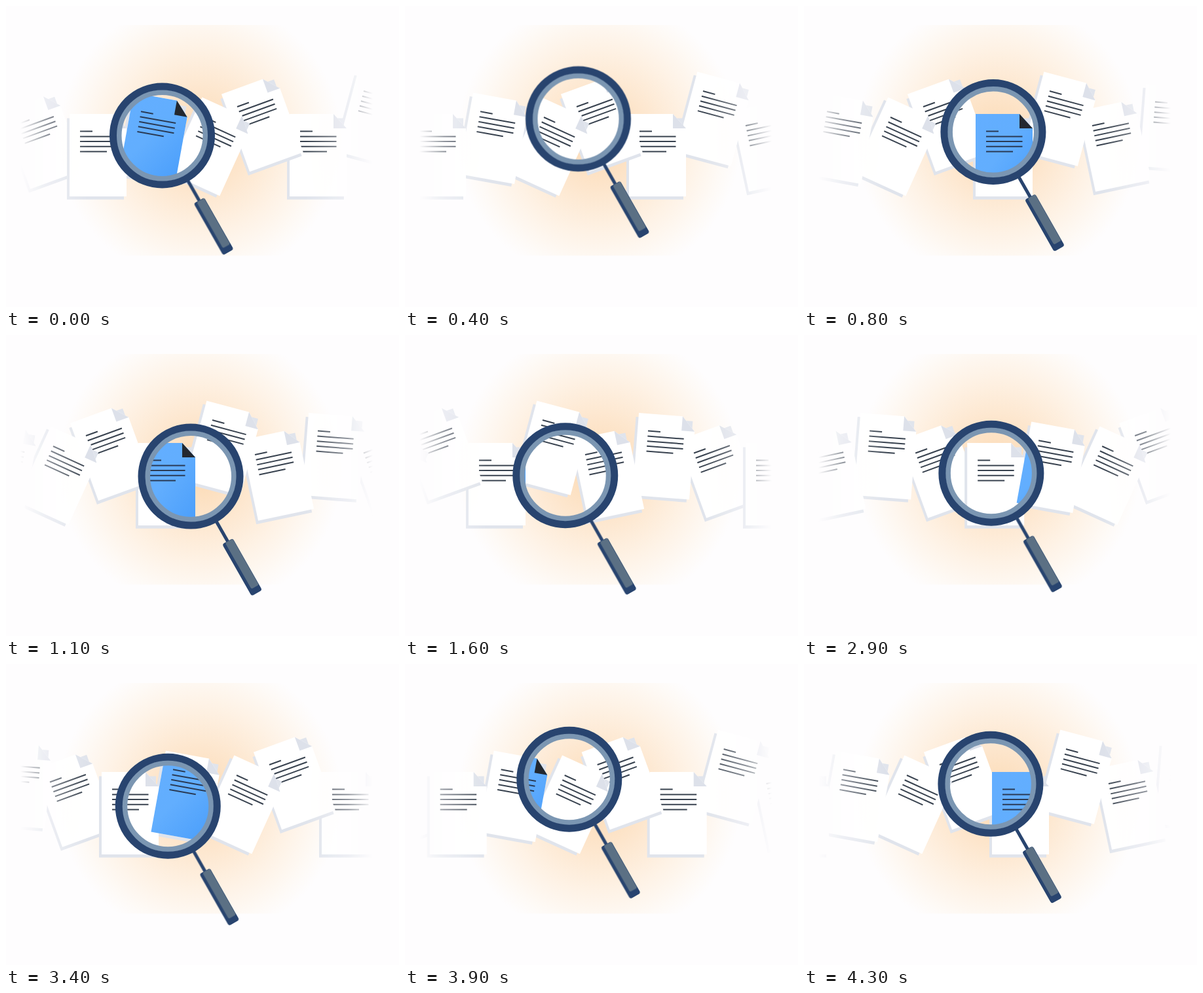
An HTML page for the animation above (4400 ms loop, 600 px wide and 460 px high).

```html
<!DOCTYPE html>
<html lang="en">
<head>
<meta charset="utf-8">
<title>Document search</title>
<style>
  html, body { margin: 0; width: 100%; height: 100%; overflow: hidden; background: #fefdfe; }
  svg { display: block; width: 100%; height: 100%; }
</style>
</head>
<body>
<svg viewBox="0 0 600 460">
  <defs>
    <radialGradient id="glow" gradientUnits="userSpaceOnUse" cx="296" cy="205" r="217">
      <stop offset="0" stop-color="#fbd9b2"/>
      <stop offset=".35" stop-color="#fde6cd"/>
      <stop offset=".65" stop-color="#fef2e5"/>
      <stop offset=".88" stop-color="#fefaf6"/>
      <stop offset="1" stop-color="#fefdfe"/>
    </radialGradient>
    <linearGradient id="fade" gradientUnits="userSpaceOnUse" x1="22" x2="560" y1="0" y2="0">
      <stop offset="0" stop-color="#fff" stop-opacity="0"/>
      <stop offset=".07" stop-color="#fff" stop-opacity=".55"/>
      <stop offset=".19" stop-color="#fff"/>
      <stop offset=".81" stop-color="#fff"/>
      <stop offset=".93" stop-color="#fff" stop-opacity=".55"/>
      <stop offset="1" stop-color="#fff" stop-opacity="0"/>
    </linearGradient>
    <linearGradient id="blue" x1="0" y1="0" x2="1" y2="1">
      <stop offset="0" stop-color="#63aeff"/>
      <stop offset=".45" stop-color="#62aefe"/>
      <stop offset="1" stop-color="#4a9efb"/>
    </linearGradient>
    <mask id="sides" maskUnits="userSpaceOnUse" x="0" y="0" width="600" height="460">
      <rect width="600" height="460" fill="url(#fade)"/>
    </mask>
    <clipPath id="lens"><circle id="lensHole" r="64"/></clipPath>

    <!-- The page's origin is the start of its first text line. -->
    <path id="sheet" d="M-16-26.3H51L71-4.3V99.7H-16Z"/>
    <path id="fold" d="M51-26.3V-4.3H71Z"/>
    <path id="text" d="M0 0H19M0 8H55.5M0 15.7H55.5M0 23.3H55.5M0 31.2H41" fill="none" stroke-width="2"/>
    <g id="page">
      <path d="M-20-20H67V104.4H-20Z" fill="#e0e4ec"/>
      <use href="#sheet" fill="#fff"/>
      <use href="#fold" fill="#dde1ea"/>
      <use href="#text" stroke="#38424f"/>
    </g>
    <g id="match">
      <use href="#sheet" fill="url(#blue)"/>
      <use href="#fold" fill="#23282f"/>
      <use href="#text" stroke="#2a3b55"/>
    </g>
  </defs>

  <rect x="76" y="29" width="440" height="352.5" fill="url(#glow)"/>
  <g id="pages" mask="url(#sides)"></g>
  <g id="matches" clip-path="url(#lens)"></g>
  <g id="glass">
    <circle r="66" fill="none" stroke="#7b96b2" stroke-width="8"/>
    <circle r="75" fill="none" stroke="#28446f" stroke-width="11"/>
    <g transform="rotate(60.4)">
      <path d="M79 0H117" stroke="#28446f" stroke-width="5"/>
      <rect x="114" y="-9" width="91" height="18.5" rx="3.5" fill="#28446f"/>
      <rect x="114.5" y="-8.5" width="81" height="13" rx="2.5" fill="#5b7084"/>
    </g>
  </g>
</svg>
<script>
const LOOP = 4400, STEP = 100, ROW = 759;
const CENTER = [264, 198], ORBIT = 25.5;

// x, y, tilt, is a match
const DOCS = [
  [113, 191.4, 0],
  [206, 161.3, 10.3, true],
  [303, 170, 24.5],
  [353, 154, -20],
  [449, 191.4, 0, true],
  [546, 130, 15],
  [611, 183, -12],
  [707, 146.5, 4.5],
  [777, 180.5, -20]
];

// ms, row scroll in px, glass angle in degrees
const KEYS = [
  [0, 0, 180],
  [400, 91, 271],
  [1100, 231, 405],
  [1600, 336, 499],
  [2300, 483, 631],
  [3400, 710, 851],
  [4300, 905, 1045]
];

const $ = id => document.getElementById(id);

function addUse(parent, ref) {
  const el = document.createElementNS('http://www.w3.org/2000/svg', 'use');
  el.setAttribute('href', ref);
  return parent.appendChild(el);
}

// Earlier pages lie on top, so they are added last.
const docs = DOCS.slice().reverse().map(([x, y, tilt, match]) => {
  const parts = [addUse($('pages'), '#page')];
  if (match) parts.push(addUse($('matches'), '#match'));
  return { x, y, tilt, parts };
});

function sample(t) {
  let i = 1;
  while (i < KEYS.length - 1 && t > KEYS[i][0]) i++;
  const a = KEYS[i - 1], b = KEYS[i];
  const k = (t - a[0]) / (b[0] - a[0]);
  return [1, 2].map(c => a[c] + (b[c] - a[c]) * k);
}

const wrap = x => ((x + 120) % ROW + ROW) % ROW - 120;

function draw(t) {
  const [scroll, angle] = sample(t);
  for (const { x, y, tilt, parts } of docs) {
    const place = `translate(${wrap(x - scroll)} ${y}) rotate(${tilt})`;
    parts.forEach(p => p.setAttribute('transform', place));
  }
  const rad = angle * Math.PI / 180;
  const cx = CENTER[0] + ORBIT * Math.cos(rad);
  const cy = CENTER[1] + ORBIT * Math.sin(rad);
  $('glass').setAttribute('transform', `translate(${cx} ${cy})`);
  $('lensHole').setAttribute('cx', cx);
  $('lensHole').setAttribute('cy', cy);
}

const start = performance.now();
function tick() {
  const t = (performance.now() - start) % LOOP;
  draw(Math.floor(t / STEP) * STEP);
  requestAnimationFrame(tick);
}
tick();
</script>
</body>
</html>
```
